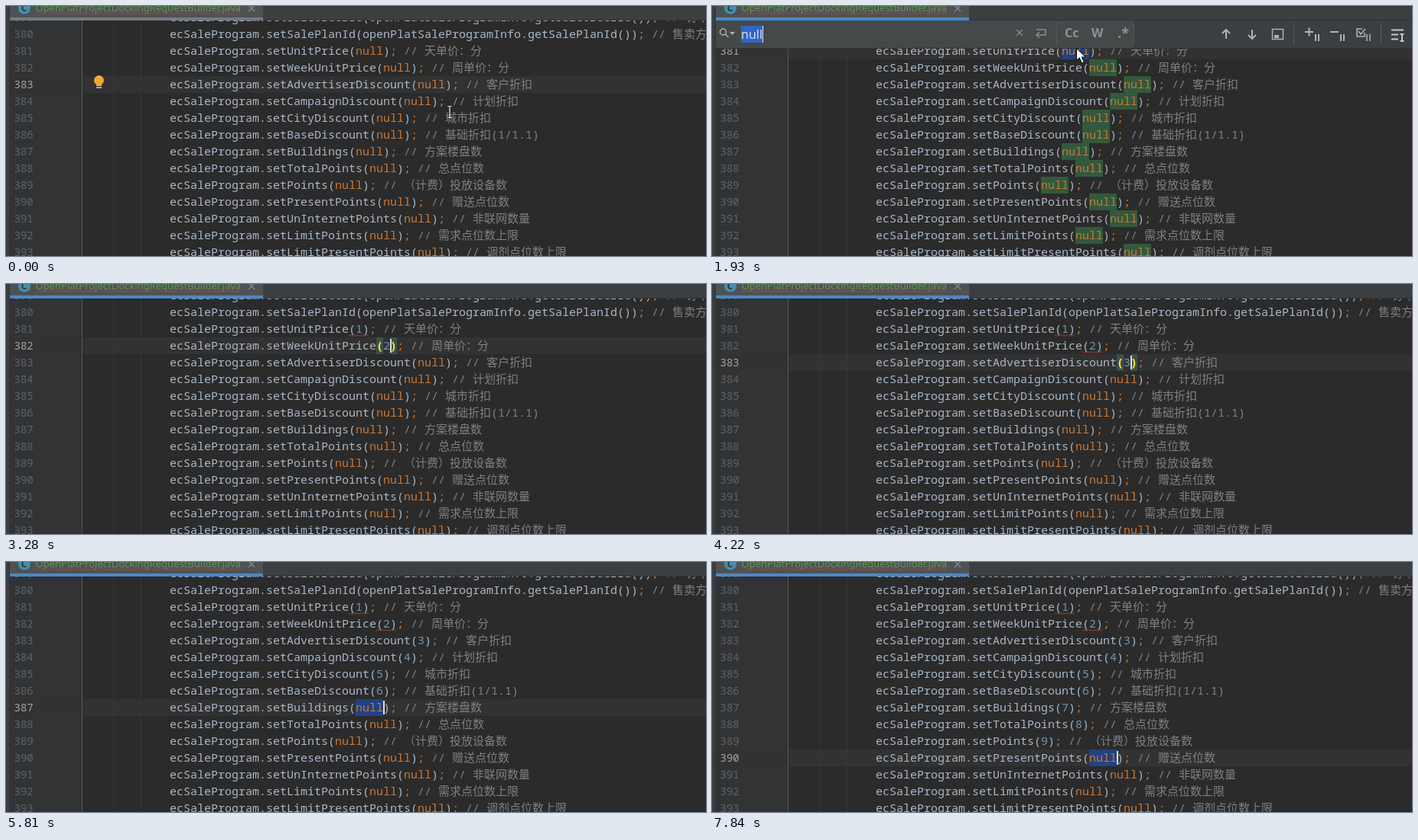
These frames come from a looping animation (915x328 px, 7.93 s). An HTML page with a canvas:

```html
<!DOCTYPE html>
<html lang="zh-CN">
<head>
<meta charset="utf-8">
<title>Editor</title>
<style>
html, body { margin: 0; width: 100%; height: 100%; overflow: hidden; background: #2b2b2b; }
canvas { display: block; }
</style>
</head>
<body>
<canvas id="stage" width="915" height="328"></canvas>
<script>
const LOOP = 7930, FIRST = 379, CHAR = 9, ROW = 22, LEFT = 214;
const MONO = '"Noto Sans Mono", "Noto Sans CJK SC", "Noto Sans CJK", monospace';
const SANS = '"Noto Sans", "Open Sans", sans-serif';
const INK = '#a9b7c6', ORANGE = '#cc7832', GREY = '#808080', NUMBER = '#6897bb';
const ICON = '#afb1b3', DIM = '#606364', RED = '#bc3f3c';

// setter name, comment, optional argument
const rows = [
  ['SaleOrderId', '订单编号', 'openPlatSaleProgramInfo.getSaleOrderId()'],
  ['SalePlanId', '售卖方案', 'openPlatSaleProgramInfo.getSalePlanId()'],
  ['UnitPrice', '天单价：分'],
  ['WeekUnitPrice', '周单价：分'],
  ['AdvertiserDiscount', '客户折扣'],
  ['CampaignDiscount', '计划折扣'],
  ['CityDiscount', '城市折扣'],
  ['BaseDiscount', '基础折扣(1/1.1)'],
  ['Buildings', '方案楼盘数'],
  ['TotalPoints', '总点位数'],
  ['Points', '（计费）投放设备数'],
  ['PresentPoints', '赠送点位数'],
  ['UnInternetPoints', '非联网数量'],
  ['LimitPoints', '需求点位数上限'],
  ['LimitPresentPoints', '调剂点位数上限'],
];

// timeline in ms
const FIND = 1070, FOUND = 1160, CLOSE = 2180;
const moves = [[0, 383], [FIND, 381], [2720, 382], [3660, 383], [4520, 384], [4820, 385],
  [5380, 386], [5810, 387], [6280, 388], [6770, 389], [7840, 390]];
const typed = [2550, 3280, 4220, 4670, 5130, 5690, 6130, 6680, 7510]; // digits from line 381 on
const waves = [2800, 4120];
const pointer = [[0, 580, 139], [70, 612, 131], [150, 565, 104], [220, 505, 75],
  [300, 467, 58], [600, 471, 62], [690, 476, 55]];

const g = document.getElementById('stage').getContext('2d', { alpha: false });
const latest = (list, t) => list.filter(e => e[0] <= t).pop();
const between = (t, a, b) => t >= a && t < b;

function box(x, y, w, h, color) {
  g.fillStyle = color;
  g.fillRect(x, y, w, h);
}

function text(s, x, y, color, font) {
  g.font = font || '15px ' + MONO;
  g.fillStyle = color;
  g.fillText(s, x, y);
}

function stroke(d, color, width = 1.5) {
  g.strokeStyle = color;
  g.lineWidth = width;
  g.stroke(new Path2D(d));
}

function wave(x, y, width) {
  let d = `M${x} ${y}`;
  for (let i = 2; i <= width; i += 2) d += `L${x + i} ${y + (i % 4 ? 2 : 0)}`;
  stroke(d, RED, 1);
}

function codeRow([name, comment, arg], i, t, current) {
  const line = FIRST + i, top = 4 + i * ROW, base = top + 16, k = line - 381;
  const active = line === current;
  const done = t >= typed[k];
  if (active) box(5, top, 910, ROW, '#323232');
  text(line, 10.5, base, active ? '#a4a3a3' : '#606366', '14px ' + MONO);

  const value = arg || (done ? String(k + 1) : 'null');
  const head = 'ecSaleProgram.set' + name;
  const open = LEFT + head.length * CHAR, start = open + CHAR, end = start + value.length * CHAR;
  const selected = active && !done && t >= FIND;
  const braces = active && done;

  if (selected) box(start, top, end - start, ROW, '#214283');
  else if (!arg && between(t, FOUND, CLOSE)) box(start, top, end - start, ROW, '#32593d');
  if (braces) {
    box(open, top, CHAR, ROW, '#3b514d');
    box(end, top, CHAR, ROW, '#3b514d');
  }
  const brace = braces ? '#ffef28' : INK;
  const font = (braces ? 'bold ' : '') + '15px ' + MONO;
  text(head, LEFT, base, INK);
  text('(', open, base, brace, font);
  text(value, start, base, arg ? INK : done ? NUMBER : ORANGE);
  text(')', end, base, brace, font);
  text(';', end + CHAR, base, ORANGE);
  text('// ' + comment, end + 3 * CHAR, base, GREY);
  if (t >= waves[k]) wave(open, top + 18.5, end + CHAR - open);
  if (active && t >= CLOSE && !between(t, 2330, 2550)) box(end, top + 2, 2, 18, '#dddddd');
}

function bulb() {
  g.fillStyle = '#f0a732';
  g.beginPath();
  g.arc(121.5, 97.5, 6.5, 0, 7);
  g.fill();
  g.fillRect(118, 101, 7, 4);
  box(118, 106, 7, 2, '#a9a9a9');
}

function tab(t) {
  box(0, 0, 915, 19, '#3c3f41');
  box(336, 18, 579, 1, '#323232');
  box(5, 0, 331, 15, '#4e5254');
  box(5, 15, 331, 4, t < 70 ? '#747a80' : '#4a88c7');
  g.fillStyle = '#468fac';
  g.beginPath();
  g.arc(24, 2.5, 8, 0, 7);
  g.fill();
  text('C', 19.8, 7, '#2b3338', 'bold 12px ' + SANS);
  text('OpenPlatProjectDockingRequestBuilder.java', 38.5, 7, '#629755', '13px ' + SANS);
  wave(39, 8.5, 269);
  stroke('M317 -1l8 8m0 -8l-8 8', '#8a8d8f', 1.2);
}

function findBar(t) {
  const tool = t < FOUND ? DIM : ICON;
  box(5, 19, 910, 37, '#3c3f41');
  box(5, 19, 546, 36, '#45494a');
  box(5, 55, 910, 1, '#323232');
  stroke('M18.5 34a4 4 0 1 1 -8 0a4 4 0 1 1 8 0M17.5 37l4 4', ICON);
  g.fillStyle = ICON;
  g.fill(new Path2D('M23 34h7l-3.5 4z'));
  box(38, 26, 28, 22, '#2f65ca');
  text('null', 38, 43, '#dddddd', '16px ' + SANS);
  if (!between(t, 1610, 1930)) box(66, 26, 1, 22, '#dddddd');

  stroke('M398 31l8 8m0 -8l-8 8', '#8a8d8f', 1.3);
  stroke('M424 31h12v7h-12m4 -4l-4 4l4 4', '#8a8d8f');
  for (const x of [450, 551, 760, 874]) box(x, 22, 1, 29, '#555859');
  text('Cc', 461, 41, '#8f9294', 'bold 16px ' + SANS);
  text('W', 496, 41, '#8f9294', 'bold 16px ' + SANS);
  text('.*', 530, 42, '#8f9294', 'bold 18px ' + SANS);

  stroke('M672 43v-12m-5 5l5 -5l5 5', tool, 2);
  stroke('M706 31v12m-5 -5l5 5l5 -5', tool, 2);
  stroke('M732.5 30.5h14v13h-14z', tool);
  box(735, 38, 6, 4, tool);
  stroke('M775 34h11m-5.5 -5.5v11M789 37v9m4 -9v9', tool, 2);
  stroke('M808 34h11M822 37v9m4 -9v9', tool, 2);
  stroke('M853 35v5h-10v-10h7m-5 3l3 4l6 -7M856 37v9m4 -9v9', tool, 1.6);
  stroke('M888 31.5h16M888 37.5h9M888 43.5h9M902 37v9m-2.5 -9h5m-5 9h5', '#c4c6c8', 2);
}

function mouse(t) {
  const [time, x, y] = latest(pointer, t);
  if (time < 690) {
    stroke(`M${x - 3} ${y - 7.5}h3v15h-3m6 0h-3v-15h3`, '#c8c8c8', 1);
  } else {
    const shape = new Path2D(`M${x + .5} ${y + .5}v16l3.8 -3.6l3 7l3 -1.3l-3 -6.6h5z`);
    g.fillStyle = '#fff';
    g.fill(shape);
    g.strokeStyle = '#000';
    g.lineWidth = 1;
    g.stroke(shape);
  }
}

function draw(t) {
  const current = latest(moves, t)[1];
  box(0, 0, 915, 328, '#2b2b2b');
  box(5, 0, 95, 328, '#313335');
  rows.forEach((row, i) => codeRow(row, i, t, current));
  box(99, 19, 1, 309, '#555555');
  box(140, 19, 1, 309, '#373737');
  box(176, 19, 1, 309, '#373737');
  if (t < FIND) bulb();
  tab(t);
  if (between(t, FIND, CLOSE)) findBar(t);
  box(0, 0, 4, 328, '#3c3f41');
  box(4, 0, 1, 328, '#323232');
  if (t < typed[0]) mouse(t);
}

const began = performance.now();
function frame() {
  draw((performance.now() - began) % LOOP);
  requestAnimationFrame(frame);
}
frame();
</script>
</body>
</html>
```
